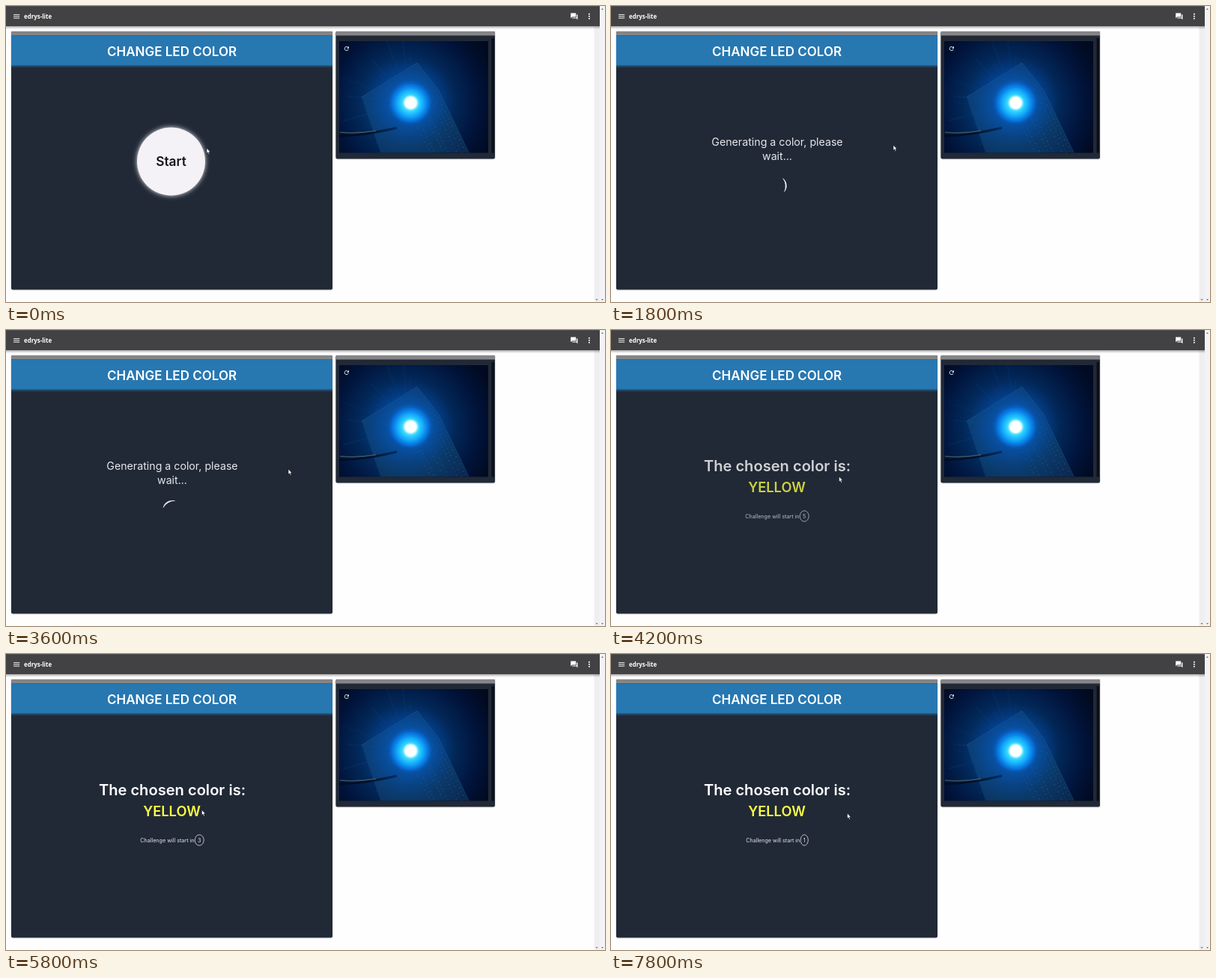
An HTML page with a canvas for the animation above (8000 ms loop, 800 px wide and 396 px high).

```html
<!DOCTYPE html>
<html lang="en">
<head>
<meta charset="utf-8">
<title>edrys-lite</title>
<style>
html, body { margin: 0; width: 100%; height: 100%; overflow: hidden; background: #fff; }
canvas { display: block; width: 800px; height: 396px; }
</style>
</head>
<body>
<canvas id="stage"></canvas>
<script>
const W = 800, H = 396, LOOP = 8000, STEP = 200;
const canvas = document.getElementById('stage');
const dpr = window.devicePixelRatio || 1;
canvas.width = W * dpr;
canvas.height = H * dpr;
const ctx = canvas.getContext('2d');
const SANS = 'Inter, "Open Sans", sans-serif';
const NAVY = '#212936';

const clamp = v => Math.max(0, Math.min(1, v));
const ease = v => v * v * (3 - 2 * v);

function rect(x, y, w, h, color) {
  ctx.fillStyle = color;
  ctx.fillRect(x, y, w, h);
}

function round(x, y, w, h, r, color) {
  ctx.fillStyle = color;
  ctx.beginPath();
  ctx.roundRect(x, y, w, h, r);
  ctx.fill();
}

function disc(x, y, r, color, ry = r) {
  ctx.fillStyle = color;
  ctx.beginPath();
  ctx.ellipse(x, y, r, ry, 0, 0, Math.PI * 2);
  ctx.fill();
}

function poly(points, color) {
  ctx.fillStyle = color;
  ctx.beginPath();
  points.forEach(([x, y]) => ctx.lineTo(x, y));
  ctx.closePath();
  ctx.fill();
}

function text(str, x, y, size, weight, color, align = 'center', family = SANS) {
  ctx.font = `${weight} ${size}px ${family}`;
  ctx.textAlign = align;
  ctx.fillStyle = color;
  ctx.fillText(str, x, y);
}

function vertical(y0, y1, from, to) {
  const g = ctx.createLinearGradient(0, y0, 0, y1);
  g.addColorStop(0, from);
  g.addColorStop(1, to);
  return g;
}

function radial(x, y, r, stops) {
  const g = ctx.createRadialGradient(x, y, 0, x, y, r);
  stops.forEach(([at, color]) => g.addColorStop(at, color));
  return g;
}

function scrollArrow(x, y, dir) {
  poly([[x - 1.5, y + dir], [x + 1.5, y + dir], [x, y - dir]], '#77777b');
}

function drawPage() {
  rect(0, 0, W, H, '#fefefe');
  rect(785.5, 27, 7.5, 369, '#efeef1');
  rect(793, 0, 7, H, '#f3f2f5');
  scrollArrow(796.5, 4, 1);
  scrollArrow(789, 393, -1);
  scrollArrow(796.5, 393, -1);

  rect(0, 27, 793, 4, vertical(27, 31, 'rgba(0,0,0,.32)', 'rgba(0,0,0,0)'));
  rect(0, 0, 793, 27, '#424143');
  rect(0, 0, 793, 1, '#4d4c4e');
  for (const y of [11.1, 13.4, 15.7]) rect(10, y, 8.2, 1, '#efefef');
  text('edrys-lite', 24, 16.6, 7.9, 700, '#fff', 'left', '"Open Sans", "Noto Sans", sans-serif');
  drawChat();
  for (const y of [10.8, 13.8, 16.8]) disc(778.9, y, 1.05, '#fff');
}

function drawChat() {
  poly([[754.2, 9.6], [761.2, 9.6], [761.2, 14.6], [756, 14.6], [754.2, 16.3]], '#fff');
  poly([[762, 11.5], [763.4, 11.5], [763.4, 18.3], [761.6, 16.6], [756.2, 16.6], [756.2, 15.4], [762, 15.4]], '#fff');
}

function drawPanel(x, w, h) {
  ctx.save();
  ctx.shadowColor = 'rgba(0,0,0,.35)';
  ctx.shadowBlur = 2 * dpr;
  round(x, 34, w, h, 2, NAVY);
  ctx.restore();
  round(x, 34, w, 5.5, [2, 2, 0, 0], '#858587');
}

function drawChallenge() {
  drawPanel(7, 429, 345.5);
  rect(7, 79, 429, 4, vertical(79, 83, 'rgba(39,120,178,.65)', 'rgba(39,120,178,0)'));
  rect(7, 39.5, 429, 39.7, '#2777b1');
  text('CHANGE LED COLOR', 221.5, 67.4, 17, 600, '#fff');
}

function drawBoard() {
  poly([[475, 122], [549, 76], [578, 113], [618, 196], [500, 196]], 'rgba(38,112,160,.24)');
  ctx.strokeStyle = 'rgba(50,135,195,.28)';
  ctx.lineWidth = 1;
  ctx.beginPath();
  ctx.moveTo(475, 122);
  ctx.lineTo(549, 76);
  ctx.lineTo(578, 113);
  ctx.lineTo(618, 196);
  ctx.stroke();
  for (let row = 0; row < 20; row++) {
    for (let col = 0; col < 9; col++) {
      if (col === 3 || col === 6) continue;
      const x = 569 + row * 2.4 - col * 4.6;
      const y = 108 + row * 4.7 + col * 2.7;
      rect(x, y, 2, 1.5, `rgba(70,155,205,${0.1 + 0.12 * ((row + col) % 2)})`);
    }
  }
}

function drawRays() {
  ctx.lineWidth = 2.5;
  for (let i = 0; i < 22; i++) {
    const a = Math.PI * (0.72 + i * 0.039);
    const len = 75 + 22 * Math.sin(i * 2.7);
    ctx.strokeStyle = `rgba(15,85,175,${0.07 + 0.05 * Math.sin(i * 4.1)})`;
    ctx.beginPath();
    ctx.moveTo(540 + 28 * Math.cos(a), 129 + 28 * Math.sin(a));
    ctx.lineTo(540 + len * Math.cos(a), 129 + len * Math.sin(a));
    ctx.stroke();
  }
}

function drawWire() {
  ctx.lineWidth = 3;
  ctx.strokeStyle = 'rgba(2,10,28,.75)';
  ctx.beginPath();
  ctx.moveTo(445, 174);
  ctx.quadraticCurveTo(480, 173, 522, 163);
  ctx.stroke();
  ctx.lineWidth = 1.5;
  ctx.strokeStyle = 'rgba(95,120,115,.6)';
  ctx.beginPath();
  ctx.moveTo(446, 169);
  ctx.quadraticCurveTo(470, 171, 494, 167);
  ctx.stroke();
}

function drawCamera() {
  drawPanel(440.5, 212.5, 170.5);
  rect(648.5, 43, 3.5, 153.5, '#0c1018');
  ctx.save();
  ctx.beginPath();
  ctx.rect(445, 47, 199, 149.5);
  ctx.clip();
  rect(445, 47, 199, 150, radial(534, 129, 125, [
    [0, '#05509f'], [0.3, '#043c80'], [0.52, '#022757'], [0.78, '#01133a'], [1, '#010a20']
  ]));
  drawBoard();
  drawRays();
  drawWire();
  rect(445, 47, 199, 150, radial(540, 129, 62, [
    [0, 'rgba(10,130,245,.95)'], [0.38, 'rgba(6,108,220,.85)'], [0.5, 'rgba(4,82,175,.55)'], [1, 'rgba(3,50,120,0)']
  ]));
  disc(540, 130, 28, radial(540, 130, 28, [
    [0, '#7ff0ff'], [0.4, '#35d6ff'], [0.65, 'rgba(18,175,255,.85)'], [1, 'rgba(8,120,235,0)']
  ]), 27);
  disc(540.5, 129.5, 11.5, radial(540.5, 129.5, 11.5, [
    [0, '#fff'], [0.65, '#fbffff'], [1, 'rgba(130,240,255,0)']
  ]), 10.5);
  ctx.restore();
  drawReload();
}

function drawReload() {
  ctx.strokeStyle = '#e8edf2';
  ctx.lineWidth = 0.9;
  ctx.beginPath();
  ctx.arc(454.8, 57, 2.6, 0.3, Math.PI * 1.75);
  ctx.stroke();
  poly([[458, 53.8], [458, 56.8], [455, 56.8]], '#e8edf2');
}

function drawStart(alpha) {
  ctx.save();
  ctx.globalAlpha = alpha;
  ctx.shadowColor = 'rgba(244,242,246,.95)';
  ctx.shadowBlur = 6 * dpr;
  disc(220.5, 208, 45.5, '#f4f2f6');
  ctx.shadowBlur = 0;
  text('Start', 220.5, 214, 17.3, 600, '#17161c');
  ctx.restore();
}

// Crescent: the gap between two circles, thick in the middle
function drawSpinner(angle) {
  ctx.save();
  ctx.translate(222, 240.5);
  ctx.rotate(angle);
  const s = Math.SQRT1_2 * 12.6;
  ctx.fillStyle = '#eef0f3';
  ctx.beginPath();
  ctx.arc(0, 0, 12.6, -Math.PI * 0.78, -Math.PI * 0.22);
  ctx.quadraticCurveTo(0, -s * 1.54, -12.6 * Math.cos(Math.PI * 0.22), -12.6 * Math.sin(Math.PI * 0.22));
  ctx.fill();
  ctx.restore();
}

function drawWaiting(t) {
  ctx.save();
  ctx.globalAlpha = 0.17 + 0.83 * ease(clamp((t - 600) / 600));
  text('Generating a color, please', 222, 187.4, 14.2, 400, '#e6e8eb');
  text('wait...', 222, 206, 14.2, 400, '#e6e8eb');
  drawSpinner((40 + (t - 600) * 0.3366) * Math.PI / 180);
  ctx.restore();
}

function drawResult(t) {
  const count = Math.min(5, 4 - Math.floor((t - 4600) / 1000));
  const shift = count === 1 ? 0.9 : 0;
  ctx.save();
  ctx.globalAlpha = 0.17 + 0.83 * ease(clamp((t - 3800) / 600));
  text('The chosen color is:', 222, 189, 20.1, 600, '#fff');
  text('YELLOW', 221.5, 217, 18.3, 600, '#fbff45');
  text('Challenge will start in', 179.3 + shift, 251.5, 7.15, 400, '#e6e8eb', 'left');
  ctx.strokeStyle = '#dfe2e6';
  ctx.lineWidth = 0.8;
  ctx.beginPath();
  ctx.ellipse(258.2, 249, 6 - shift, 7.2, 0, 0, Math.PI * 2);
  ctx.stroke();
  text(String(count), 258.2, 251.6, 7.2, 400, '#e6e8eb');
  ctx.restore();
}

// Pointer route: time, x, y
const ROUTE = [
  [0, 268, 190], [400, 232, 187], [800, 232, 187], [1600, 377, 186],
  [3800, 377, 186], [4600, 232, 206], [5400, 232, 206], [6400, 315.5, 213], [LOOP, 315.5, 213]
];

function pointerAt(t) {
  const i = ROUTE.findIndex((p, n) => n > 0 && t <= p[0]);
  const [t0, x0, y0] = ROUTE[i - 1], [t1, x1, y1] = ROUTE[i];
  const k = ease(clamp((t - t0) / (t1 - t0)));
  return [x0 + (x1 - x0) * k, y0 + (y1 - y0) * k];
}

function drawPointer(t) {
  const [x, y] = pointerAt(t);
  const overText = (t >= 600 && t <= 800) || (t >= 4600 && t <= 5400);
  ctx.save();
  ctx.translate(x, y);
  if (overText) {
    rect(-0.4, -3.5, 0.9, 7.5, '#10141b');
    rect(-1.6, -4, 3.3, 0.8, '#10141b');
    rect(-1.6, 3.7, 3.3, 0.8, '#10141b');
  } else {
    const arrow = [[0, 0], [0, 7.2], [1.6, 5.8], [2.8, 8.5], [4, 8], [2.9, 5.3], [5, 5.2]];
    poly(arrow, '#fff');
    ctx.strokeStyle = '#0d1016';
    ctx.lineWidth = 0.6;
    ctx.stroke();
  }
  ctx.restore();
}

function draw(t) {
  ctx.setTransform(dpr, 0, 0, dpr, 0, 0);
  drawPage();
  drawChallenge();
  drawCamera();
  if (t < 600) drawStart(1);
  else if (t < 3800) drawWaiting(t);
  else drawResult(t);
  drawPointer(t);
}

const began = performance.now();
function tick() {
  const t = (performance.now() - began) % LOOP;
  draw(Math.floor(t / STEP) * STEP);
  requestAnimationFrame(tick);
}
tick();
</script>
</body>
</html>
```
